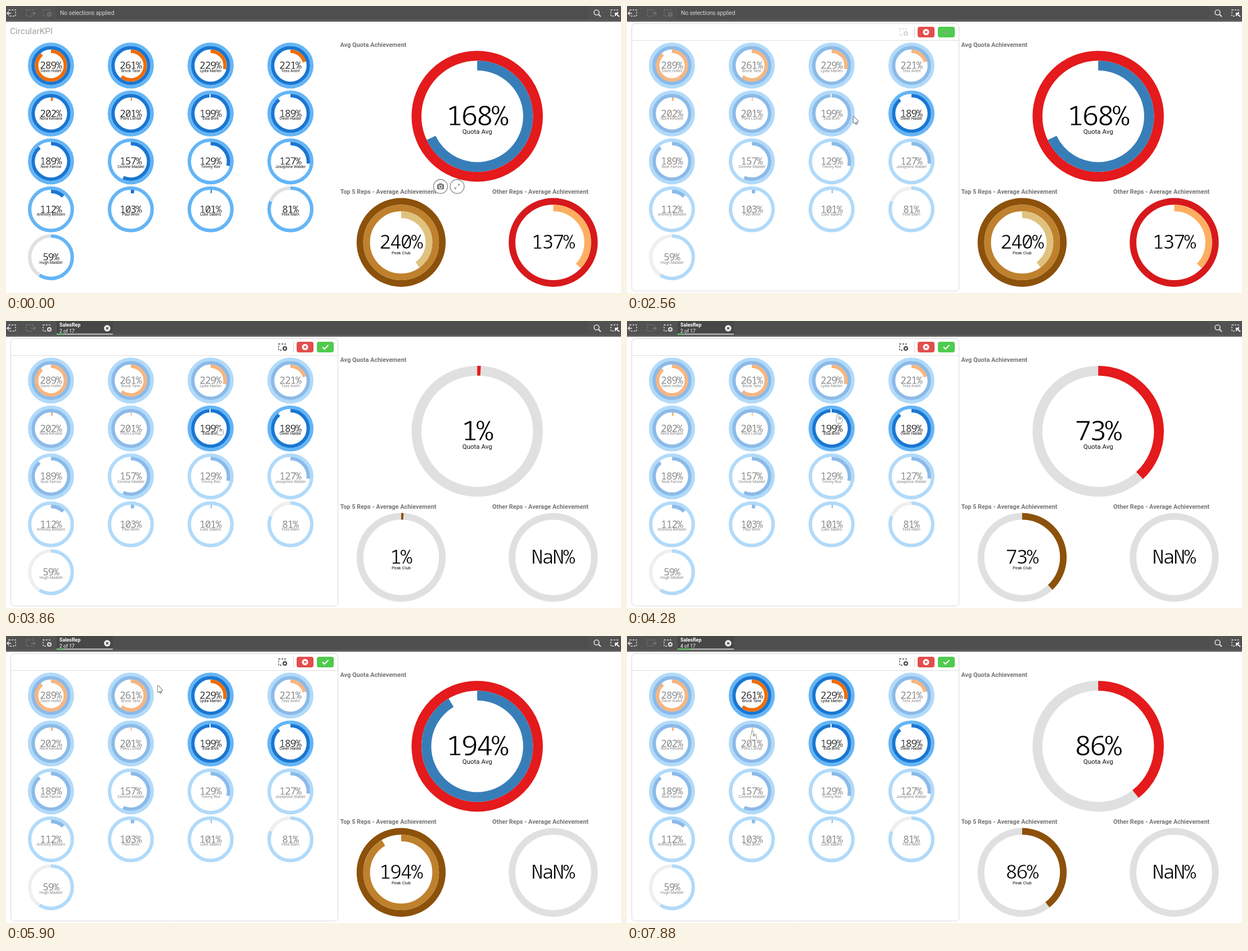
Animation of 1094x512 px, one loop 8000 ms. Source, as an HTML page with a canvas:

```html
<!DOCTYPE html>
<html lang="en">
<head>
<meta charset="utf-8">
<title>Circular KPI dashboard</title>
<style>
  html, body { margin: 0; height: 100%; overflow: hidden; background: #fff; }
  canvas { display: block; }
</style>
</head>
<body>
<canvas id="stage" width="1094" height="512"></canvas>
<script>
const ctx = document.getElementById('stage').getContext('2d');
const LOOP = 8000, TAU = Math.PI * 2;
const FIRST_TURN = 1130, NEXT_TURN = 980, HAIRLINE = .004;
const SANS = 'Roboto, "Open Sans", sans-serif', MONO = '"Noto Sans Mono", monospace';

const QUOTA = { x: 838.2, y: 196.7, r: 116.8, size: 50, colors: ['#e41a1c', '#377eb8', '#4daf4a'], label: 'Quota Avg', labelSize: 11.5, labelDy: 31 };
const TOP = { x: 702.9, y: 421.7, r: 79.2, size: 35, colors: ['#8c510a', '#bf812d', '#dfc27d'], label: 'Peak Club', labelSize: 7.6, labelDy: 21 };
const OTHER = { x: 973.4, y: 421.7, r: 79.2, size: 35, colors: ['#d7191c', '#fdae61'] };

const REPS = [
  ['Davin Hollet', 289], ['Brock Tane', 261], ['Lydia Marlen', 229], ['Tess Averil', 221],
  ['Nora Kelvane', 202], ['Piers Lomat', 201], ['Elsa Brint', 199], ['Owen Halder', 189],
  ['Noel Farrow', 189], ['Corinne Maddel', 157], ['Timmy Roe', 129], ['Josephine Walder', 127],
  ['Anthony Bellisen', 112], ['Paul Wren', 103], ['Luke Sabers', 101], ['Felix Marn', 81], ['Hugh Maddel', 59]
].map(([label, percent], i) => ({
  label, percent, x: 80 + 142 * (i % 4), y: 106.2 + 85.5 * Math.floor(i / 4), r: 41, size: 17.7,
  colors: ['#64b5f6', '#1976d2', '#ef6c00'], labelSize: 6.8, labelDy: 11.3
}));

// clicks on a rep, and the moment the charts and the top bar follow
const PICKS = [
  { rep: REPS[7], clicked: 2140, applied: 2670 },
  { rep: REPS[6], clicked: 3760, applied: 3845 },
  { rep: REPS[2], clicked: 5600, applied: 6040 },
  { rep: REPS[1], clicked: 7420, applied: 7432 }
];

// places where the pointer rests
const STOPS = [
  { from: 250, to: 250, x: 930, y: 418 }, { from: 880, to: 2140, x: 512, y: 200 },
  { from: 2500, to: 2600, x: 403, y: 197 }, { from: 3100, to: 4100, x: 379, y: 188 },
  { from: 4900, to: 5500, x: 362, y: 90 }, { from: 5860, to: 5950, x: 270, y: 88 },
  { from: 6720, to: 7430, x: 233, y: 104 }, { from: 7650, to: LOOP, x: 223, y: 170 }
];

const clamp = (v, lo = 0, hi = 1) => Math.min(hi, Math.max(lo, v));

// the screen refreshes quickly at first, then more slowly
function hold(t) {
  const [anchor, step] = t < 4600 ? [3855, 84] : [7878, 223];
  return anchor + Math.floor((t - anchor) / step) * step;
}

function text(str, x, y, size, color, { weight = 400, align = 'left', spacing = 0 } = {}) {
  ctx.font = `${weight} ${size}px ${SANS}`;
  ctx.letterSpacing = spacing + 'px';
  ctx.textAlign = align;
  ctx.fillStyle = color;
  ctx.fillText(str, x, y);
}

// light monospaced figures: a white outline thins the strokes
function figures(str, x, y, size) {
  const spacing = -size * .06;
  ctx.font = `300 ${size}px ${MONO}`;
  ctx.letterSpacing = spacing + 'px';
  ctx.textAlign = 'center';
  ctx.fillStyle = '#000';
  ctx.fillText(str, x + spacing / 2, y);
  ctx.strokeStyle = '#fff';
  ctx.lineWidth = size * .018;
  ctx.strokeText(str, x + spacing / 2, y);
}

function box(x, y, w, h, color) {
  ctx.fillStyle = color;
  ctx.fillRect(x, y, w, h);
}

function line(points, color, width = 1) {
  ctx.beginPath();
  for (let i = 0; i < points.length; i += 2) ctx.lineTo(points[i], points[i + 1]);
  ctx.strokeStyle = color;
  ctx.lineWidth = width;
  ctx.stroke();
}

function disc(x, y, r, fill, stroke, width = 1) {
  ctx.beginPath();
  ctx.arc(x, y, r, 0, TAU);
  if (fill) { ctx.fillStyle = fill; ctx.fill(); }
  if (stroke) { ctx.strokeStyle = stroke; ctx.lineWidth = width; ctx.stroke(); }
}

function rounded(x, y, w, h, r, fill, stroke) {
  ctx.beginPath();
  ctx.roundRect(x, y, w, h, r);
  if (fill) { ctx.fillStyle = fill; ctx.fill(); }
  if (stroke) { ctx.strokeStyle = stroke; ctx.lineWidth = 1; ctx.stroke(); }
}

function arc(x, y, r, width, from, to, color) {
  if (to <= from) return;
  ctx.beginPath();
  ctx.arc(x, y, r, TAU * (from - .25), TAU * (to - .25));
  ctx.strokeStyle = color;
  ctx.lineWidth = width;
  ctx.stroke();
}

function gauge({ x, y, r, size, colors, label, labelSize, labelDy }, sweeps, number) {
  const width = r * .15;
  arc(x, y, r - width / 2, width, sweeps[0] || 0, 1, '#e0e0e0');
  sweeps.forEach((sweep, i) => arc(x, y, r - width * (i + .5), width, 0, sweep, colors[i]));
  figures(number + '%', x, y + size * .33, size);
  if (label) text(label, x, y + labelDy, labelSize, '#111', { align: 'center' });
}

function fullGauge(spec, percent) {
  gauge(spec, [0, 1, 2].map(i => clamp(percent / 100 - i)), percent);
}

// rings fill one after another while the number counts along with the first
function runGauge(spec, t, percent) {
  const p = clamp(t / FIRST_TURN, HAIRLINE), turns = (t - FIRST_TURN) / NEXT_TURN;
  const sweeps = [0, 1].map(i => {
    const share = clamp(percent / 100 - 1 - i);
    return turns < 0 || !share ? 0 : clamp(turns - i, HAIRLINE / 2, share);
  });
  gauge(spec, [p, ...sweeps], Math.floor(p * percent));
}

function cross(x, y, r, color) {
  line([x - r, y - r, x + r, y + r], color, 1.6);
  line([x - r, y + r, x + r, y - r], color, 1.6);
}

function dashedBox(x, y, color) {
  ctx.setLineDash([3, 2]);
  ctx.strokeStyle = color;
  ctx.lineWidth = 1.3;
  ctx.strokeRect(x, y, 12, 11);
  ctx.setLineDash([]);
}

function clearIcon(x, y, color, back) {
  dashedBox(x, y, color);
  disc(x + 11, y + 8, 5, back);
  disc(x + 11, y + 8, 4, color);
  cross(x + 11, y + 8, 1.5, back);
}

function stepIcon(x, dir, color, back) {
  const tip = x + (dir < 0 ? -3 : 16);
  dashedBox(x, 7, color);
  box(Math.min(tip, tip - 8 * dir), 9, 8, 8, back);
  line([tip - 7 * dir, 13, tip, 13], color, 1.6);
  line([tip - 3 * dir, 10, tip, 13, tip - 3 * dir, 16], color, 1.6);
}

function topBar(count) {
  const bright = '#e0e0e0', dim = '#757575', back = '#525252';
  box(0, 0, 1094, 28, back);
  box(90, 0, 946, 24, '#4e4e4e');
  box(0, 24.5, 1094, 3.5, '#5d5d5d');
  stepIcon(5, -1, bright, back);
  stepIcon(36, 1, dim, back);
  clearIcon(66, 7, count ? bright : dim, back);
  if (count) {
    box(90, 0, 100, 24, '#474747');
    box(90, 22.5, 100, 1.8, '#cfcfcf');
    box(90, 22.5, 100 * count / REPS.length, 1.8, '#52cc52');
    text('SalesRep', 95, 10, 8.9, '#fff', { weight: 700 });
    text(count > 1 ? `${count} of ${REPS.length}` : PICKS[0].rep.label, 95, 21, 8.7, '#fff');
    disc(180, 13, 5.7, '#f2f2f2');
    cross(180, 13, 2, '#474747');
  } else text('No selections applied', 96, 16, 10.5, '#d2d2d2', { spacing: -.2 });
  disc(1050.5, 11.5, 4.5, null, bright, 1.6);
  line([1054, 15, 1058, 19], bright, 2.2);
  dashedBox(1076, 7, bright);
  box(1082, 12, 9, 8, back);
  line([1084, 18, 1084, 13, 1089, 13], '#fff', 1.8);
  line([1084, 13, 1091, 19], '#fff', 1.8);
}

function panel(enabled) {
  rounded(8.5, 31.5, 582, 477, 6, '#fff', '#d9d9d9');
  line([9, 61.5, 590, 61.5], '#dedede');
  clearIcon(485, 41, enabled ? '#404040' : '#d4d4d4', '#fff');
  line([511.5, 37, 511.5, 56], '#d4d4d4');
  rounded(517, 37, 30, 19, 4, '#e34d4d');
  disc(532, 46.5, 5.5, '#fff');
  cross(532, 46.5, 2, '#e34d4d');
  rounded(553, 37, 30, 19, 4, '#4fcb4f');
  line([563, 46.5, 566.5, 50, 573.5, 43], enabled ? '#fff' : '#8aab8a', 2);
}

function hoverButtons(x, y, alpha) {
  const grey = '#707070', right = x + 29.5;
  ctx.globalAlpha = alpha;
  for (const cx of [x, right]) disc(cx, y, 12.5, '#fff', '#858585', 1.3);
  rounded(x - 6, y - 4, 12, 9, 1.5, grey);
  box(x - 3, y - 5.5, 6, 2, grey);
  disc(x, y + .5, 2.7, grey, '#fff', 1.3);
  for (const d of [-1, 1]) {
    line([right + d, y - d, right + 4 * d, y - 4 * d], grey);
    line([right + 1.5 * d, y - 4 * d, right + 4 * d, y - 4 * d, right + 4 * d, y - 1.5 * d], grey);
  }
  ctx.globalAlpha = 1;
}

function hand() {
  const shapes = [[-1.5, -.5, 3, 11, 1.5], [-3, 5.5, 10.5, 10, 3]];
  for (const s of shapes) rounded(...s, null, '#222');
  for (const s of shapes) rounded(...s, '#fff');
  for (const x of [1.8, 4.4]) line([x, 6, x, 9], '#222', .8);
}

function arrow() {
  line([3, 8, 5.6, 13.8], '#222', 3.6);
  line([0, 0, 0, 12, 8.5, 8.6, 0, 0], '#222', 1.1);
  ctx.fillStyle = '#fff';
  ctx.fill();
  line([3, 8, 5.3, 13.2], '#fff', 1.7);
}

function pointer(t) {
  const i = STOPS.findLastIndex(stop => stop.from <= t);
  if (i < 0) return;
  const a = STOPS[i], b = STOPS[i + 1] || a;
  const p = b === a ? 0 : clamp((t - a.to) / (b.from - a.to));
  const x = a.x + (b.x - a.x) * p, y = a.y + (b.y - a.y) * p;
  ctx.save();
  ctx.translate(x, y);
  REPS.some(rep => Math.hypot(rep.x - x, rep.y - y) < 38) ? hand() : arrow();
  ctx.restore();
}

function draw(t) {
  const applied = PICKS.filter(pick => pick.applied <= t), count = applied.length;
  const chosen = PICKS.filter(pick => pick.clicked <= t).map(pick => pick.rep);
  box(0, 0, 1094, 512, '#fff');
  topBar(count);
  text('CircularKPI', 7, 50, 15.4, '#a8a29b');
  if (chosen.length) panel(count > 0);

  for (const rep of REPS) {
    ctx.globalAlpha = chosen.length && !chosen.includes(rep) ? .5 : 1;
    fullGauge(rep, rep.percent);
  }
  ctx.globalAlpha = 1;

  const title = (str, x, y) => text(str, x, y, 10.9, '#757575', { weight: 700 });
  title('Avg Quota Achievement', 594.5, 72.7);
  title('Top 5 Reps - Average Achievement', 594.5, 335);
  title('Other Reps - Average Achievement', 865, 335);

  if (count) {
    const mean = Math.round(applied.reduce((sum, pick) => sum + pick.rep.percent, 0) / count);
    const elapsed = t - applied[count - 1].applied;
    runGauge(QUOTA, elapsed, mean);
    runGauge(TOP, elapsed, mean);
    gauge(OTHER, [], 'NaN');
  } else {
    fullGauge(QUOTA, 168);
    fullGauge(TOP, 240);
    fullGauge(OTHER, 137);
  }

  if (t < 540) hoverButtons(773, 322, clamp((540 - t) / 290));
  if (t >= 1130 && t < 1830) hoverButtons(548, 60, clamp((t - 1050) / 250));
  pointer(t);
}

function frame(now) {
  draw(hold(now % LOOP));
  requestAnimationFrame(frame);
}
requestAnimationFrame(frame);
</script>
</body>
</html>
```
